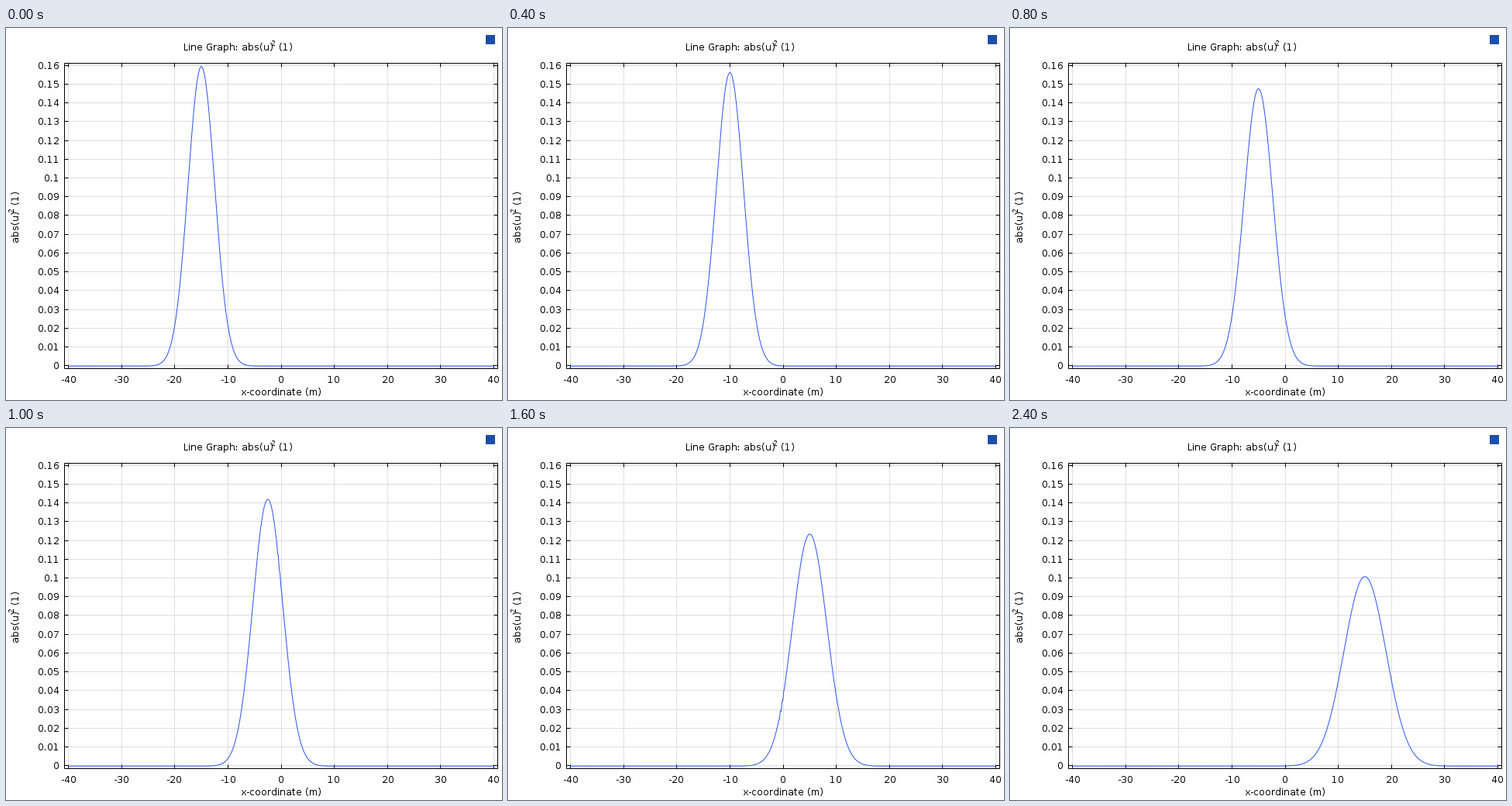
A matplotlib script for the animation above (2500 ms loop, 640 px wide and 480 px high).

```python
import numpy as np
import matplotlib.pyplot as plt
from matplotlib.animation import FuncAnimation
from matplotlib.patches import Rectangle

W, H, DPI = 640, 480, 80
PX = 72 / DPI                      # points per pixel
FRAMES, INTERVAL = 25, 100
LEFT, RIGHT, TOP, BOTTOM = 75.5, 634.5, 45.5, 439.5

# whole-pixel glyph advances
plt.rcParams.update({"font.family": "DejaVu Sans",
                     "text.hinting": "native", "text.hinting_factor": 1})
fig = plt.figure(figsize=(W / DPI, H / DPI), dpi=DPI, facecolor="#fefefe")
ax = fig.add_axes([0, 0, 1, 1])
ax.set_xlim(0, W)
ax.set_ylim(H, 0)
ax.axis("off")


def to_x(v):
    return 355 + 6.865 * v


def to_y(v):
    return 435.75 - 2422 * v


def mid(p):
    """Centre of the pixel that holds p."""
    return np.floor(p) + 0.5


def seg(x0, y0, x1, y1, color="black", z=3):
    ax.plot([x0, x1], [y0, y1], color=color, lw=PX, zorder=z,
            solid_capstyle="butt", snap=False)


def label(x, y, s, ha="left", size=12, rotation=0):
    ax.text(x, y, s, ha=ha, va="baseline", fontsize=size * PX,
            rotation=rotation, rotation_mode="anchor", zorder=5)


def draw_axes():
    for v in range(-40, 41, 10):
        x = mid(to_x(v))
        seg(x, TOP, x, BOTTOM, "#dedede", 1)
        seg(x, TOP, x, TOP + 5)
        seg(x, BOTTOM, x, BOTTOM - 5)
        label(x, 458, f"{v}", "center")
    for i in range(17):
        y = mid(to_y(i / 100))
        seg(LEFT, y, RIGHT, y, "#dedede", 1)
        seg(LEFT, y, LEFT + 5, y)
        seg(RIGHT, y, RIGHT - 5, y)
        label(69, y + 4.5, f"{i / 100:g}", "right")
    ax.add_patch(Rectangle((LEFT, TOP), RIGHT - LEFT, BOTTOM - TOP, fill=False,
                           ec="black", lw=PX, zorder=4, snap=False))


def draw_titles():
    label(229, 29, "Line Graph: abs(u)")
    label(342, 23, "2", size=9)
    label(352, 29, "(1)")
    label(304, 474, "x-coordinate (m)")
    label(16, 276, "abs(u)", rotation=90)
    label(10, 237, "2", size=9, rotation=90)
    label(16, 227, "(1)", rotation=90)
    ax.add_patch(Rectangle((619, 9), 12, 12, fc="#1d4fa8", ec="none"))


def density(t):
    """Spreading Gaussian packet with a brief ripple at the origin."""
    center = -15 + 1.25 * t
    sigma = 2.5 * np.sqrt(1 + (t / 19.6) ** 2)
    rho = np.exp(-((xs - center) / sigma) ** 2 / 2) / (sigma * np.sqrt(2 * np.pi))
    amp = 0.0045 * np.exp(-((t - 13) / 2.6) ** 2)
    ripple = np.cos(2 * np.pi * (xs + 0.2) / 0.33) - 0.3
    return rho + amp * ripple * np.exp(-((xs + 0.3) / 0.55) ** 2)


xs = np.linspace(-40, 40, 1601)
draw_axes()
draw_titles()
curve, = ax.plot([], [], color="#2d55f0", lw=PX, zorder=3.5, snap=False)


def update(i):
    curve.set_data(to_x(xs), to_y(density(i)) + 0.5)
    return curve,


anim = FuncAnimation(fig, update, frames=FRAMES, interval=INTERVAL,
                     repeat=True, repeat_delay=0)
plt.show()
```
